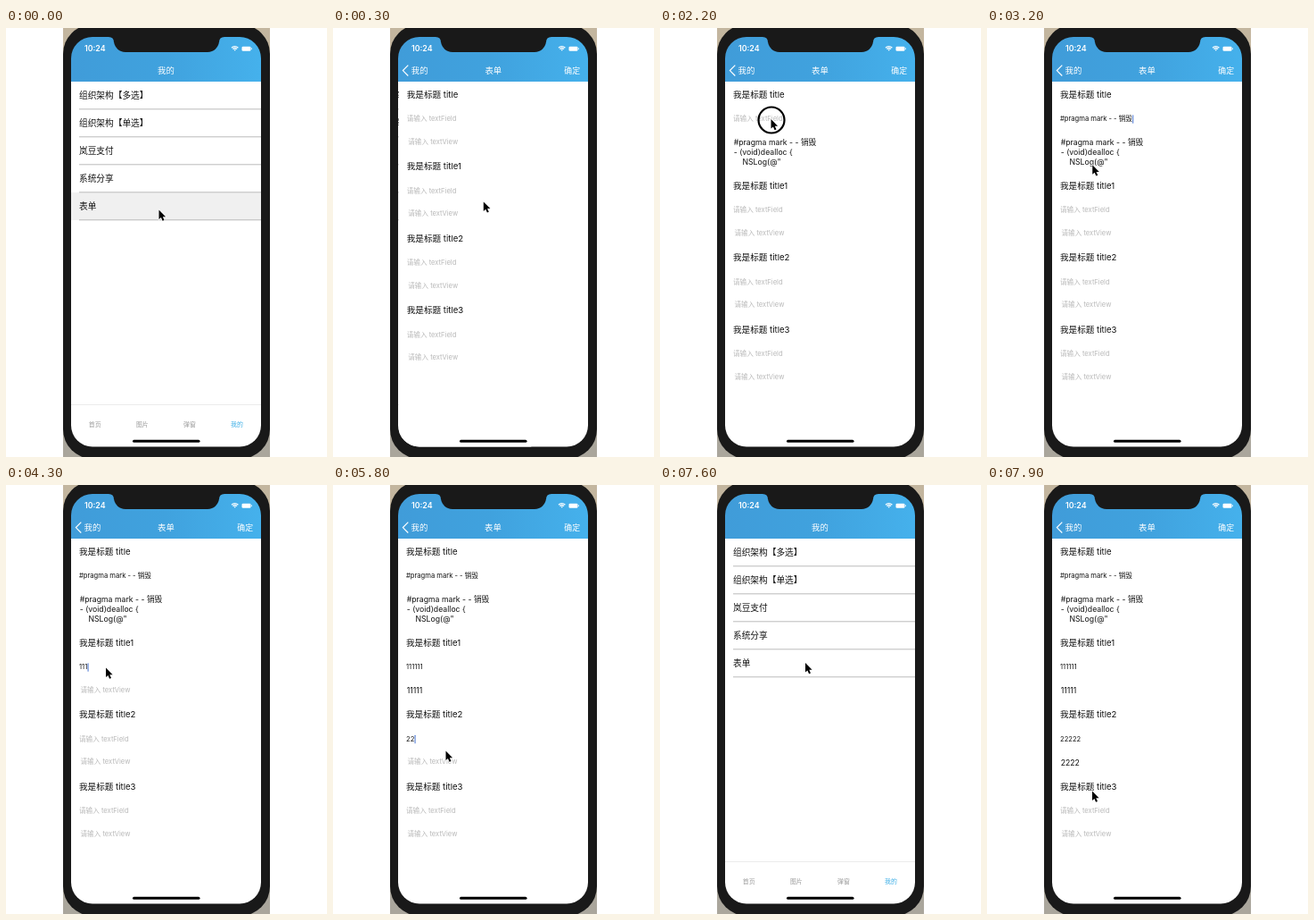
Recreate the animation shown at these times as an HTML page with a canvas. Size 360 by 480 pixels, loop 8000 ms.

```html
<!DOCTYPE html>
<html lang="zh">
<head>
<meta charset="utf-8">
<style>
html, body { margin: 0; height: 100%; overflow: hidden; background: #fff; }
canvas { display: block; width: 360px; height: 480px; }
</style>
</head>
<body>
<canvas></canvas>
<script>
const LOOP = 8000, STEP = 100;
const LEFT = 73, RIGHT = 286, WIDTH = RIGHT - LEFT;
const FONT = 'Inter, "Noto Sans CJK SC", "Noto Sans CJK", sans-serif';
const BLUE = '#3daee6';

const canvas = document.querySelector('canvas');
const c = canvas.getContext('2d');
const dpr = window.devicePixelRatio || 1;
canvas.width = 360 * dpr;
canvas.height = 480 * dpr;

const rows = ['组织架构【多选】', '组织架构【单选】', '岚豆支付', '系统分享', '表单'];
const tabs = ['首页', '图片', '弹窗', '我的'];
const snippet = '#pragma mark - - 销毁';

// Inputs in pairs (text field, text view): focus begins/ends, typing starts, ms per key
const inputs = [
  { text: snippet, focus: [2300, 3700], start: 2700, key: 0 },
  { text: snippet + '\n- (void)dealloc {\n    NSLog(@"', focus: [1400, 2100], start: 1800, key: 0 },
  { text: '111111', focus: [3800, 4750], start: 4100, key: 100 },
  { text: '11111', focus: [4800, 5450], start: 4900, key: 80 },
  { text: '22222', focus: [5500, 6250], start: 5700, key: 100 },
  { text: '2222', focus: [6300, 6900], start: 6400, key: 80 }
];

// Pointer stops: time, x, y
const stops = [
  [0, 171.5, 203.5], [200, 171.5, 203], [700, 158, 160], [800, 158, 160],
  [1200, 145.5, 122.5], [1900, 145.5, 122.5], [2100, 124.5, 102], [2800, 124.5, 102],
  [3600, 112, 204.5], [4400, 112, 204.5], [4700, 124, 229], [5000, 124, 229],
  [5400, 125, 284], [5600, 125, 284], [5800, 126.5, 297.5], [6200, 126.5, 308],
  [6500, 126.5, 308], [6900, 92, 48], [7000, 92, 48], [7400, 163, 199],
  [7700, 163, 199], [7900, 118, 342.5]
];
const clicks = [1200, 2100, 3700, 4700, 5400, 6200, 6900];

const clamp = v => Math.max(0, Math.min(1, v));
const easeOut = v => 1 - (1 - clamp(v)) ** 3;

function text(str, x, y, size, color = '#111', align = 'left', weight = 400) {
  c.font = `${weight} ${size}px ${FONT}`;
  c.fillStyle = color;
  c.textAlign = align;
  c.fillText(str, x, y);
}

function box(x, y, w, h, r, color) {
  c.fillStyle = color;
  c.beginPath();
  c.roundRect(x, y, w, h, r);
  c.fill();
}

function line(points, color, width) {
  c.strokeStyle = color;
  c.lineWidth = width;
  c.beginPath();
  points.forEach(([x, y]) => c.lineTo(x, y));
  c.stroke();
}

function typed(input, t) {
  if (t < input.start) return '';
  return input.key ? input.text.slice(0, Math.floor((t - input.start) / input.key) + 1) : input.text;
}

function pointerAt(t) {
  const i = stops.findIndex(s => s[0] > t);
  if (i < 0) return stops[stops.length - 1].slice(1);
  const [t0, x0, y0] = stops[i - 1], [t1, x1, y1] = stops[i];
  const k = (t - t0) / (t1 - t0);
  return [x0 + (x1 - x0) * k, y0 + (y1 - y0) * k];
}

// 0 shows the list, 1 shows the form
function formShown(t) {
  if (t < 7000) return easeOut((t - 20) / 330);
  if (t < 7600) return 1 - easeOut((t - 6960) / 330);
  return easeOut((t - 7610) / 190);
}

function drawList(selected) {
  box(LEFT, 60, WIDTH, 410, 0, '#fff');
  if (selected) box(LEFT, 184, WIDTH, 31, 0, '#f0f0f0');
  rows.forEach((label, i) => {
    const y = 60 + 31 * i;
    text(label, 82, y + 19.2, 9.7);
    line([[82, y + 30.8], [RIGHT, y + 30.8]], '#b4b4b4', 0.9);
  });
  line([[LEFT, 421.5], [RIGHT, 421.5]], '#e6e6e6', 0.8);
  tabs.forEach((label, i) =>
    text(label, 99.7 + 53.1 * i, 446, 6.9, i === 3 ? BLUE : '#999', 'center'));
}

function drawInput(input, isView, y, t) {
  const value = input ? typed(input, t) : '';
  const x = isView ? 82.7 : 82;
  const size = isView ? 8.7 : 7.6;
  const lines = value.split('\n');
  if (value) lines.forEach((s, i) => text(s, x, y + (isView ? 1.2 : 0) + 10.7 * i, size));
  else text('请输入 ' + (isView ? 'textView' : 'textField'), isView ? 83.5 : 82, y, 7.6, '#b9b9b9');

  if (input && t >= input.focus[0] && t < input.focus[1]) {
    const last = lines.length - 1;
    c.font = `400 ${size}px ${FONT}`;
    const end = x + c.measureText(lines[last]).width + 0.3;
    box(end, y - 7 + 10.7 * last, 1, 9.5, 0.5, '#4573d2');
  }
}

function drawForm(t) {
  box(LEFT, 60, WIDTH, 410, 0, '#fff');
  const grow = typed(inputs[1], t) ? 21.5 : 0;
  for (let i = 0; i < 4; i++) {
    const y = 80.5 * i + (i ? grow : 0);
    text('我是标题 title' + (i || ''), 82, y + 77.7, 9.6);
    drawInput(inputs[2 * i], false, y + 104.2, t);
    drawInput(inputs[2 * i + 1], true, y + 129.9, t);
  }
}

function drawHeader(p) {
  const g = c.createLinearGradient(LEFT, 0, RIGHT, 0);
  g.addColorStop(0, '#409cd9');
  g.addColorStop(0.5, '#40a2de');
  g.addColorStop(1, '#45b1ec');
  box(LEFT, 8, WIDTH, 52, 0, g);

  text('10:24', 88, 26.3, 8.8, '#fff', 'left', 600);
  c.strokeStyle = '#fff';
  c.lineWidth = 1.3;
  for (const r of [1, 3, 5]) {
    c.beginPath();
    c.arc(256.7, 25.7, r, -Math.PI * 0.76, -Math.PI * 0.24);
    c.stroke();
  }
  box(264.5, 20.7, 10, 5, 1.3, '#fff');
  box(275, 22.2, 0.8, 2, 0.4, '#fff');

  c.globalAlpha = 1 - p;
  text('我的', 179.5 - 82 * p, 51, 9.4, '#fff', 'center');
  c.globalAlpha = p;
  text('表单', 179.5 + 90 * (1 - p), 51, 9.4, '#fff', 'center');
  line([[84.3, 41.7], [78.4, 47.6], [84.3, 53.5]], '#fff', 1.2);
  text('我的', 87.5 + 82 * (1 - p), 51, 9.4, '#fff');
  text('确定', 277, 50.7, 8.9, '#fff', 'right');
  c.globalAlpha = 1;
}

function drawNotch() {
  const color = '#191919';
  box(121, 0, 118, 27, [0, 0, 13, 13], color);
  c.beginPath();
  c.moveTo(115, 9);
  c.lineTo(115, 10);
  c.quadraticCurveTo(121, 10, 121, 16);
  c.lineTo(239, 16);
  c.quadraticCurveTo(239, 10, 245, 10);
  c.lineTo(245, 9);
  c.fill();
}

function shifted(dx, draw) {
  c.save();
  c.translate(dx, 0);
  draw();
  c.restore();
}

function drawPointer(t) {
  const [x, y] = pointerAt(t);
  if (clicks.some(start => t >= start && t < start + 200)) {
    c.strokeStyle = '#000';
    c.lineWidth = 2.2;
    c.beginPath();
    c.arc(x + 0.5, y + 1, 14.5, 0, 7);
    c.stroke();
  }
  shifted(0, () => {
    c.translate(x, y);
    const arrow = new Path2D('M0 0V10.6L2.4 8.4L4.1 12.2L6 11.4L4.3 7.7H7.6Z');
    c.strokeStyle = '#fff';
    c.lineWidth = 1.2;
    c.stroke(arrow);
    c.fillStyle = '#000';
    c.fill(arrow);
  });
}

function draw(t) {
  const p = formShown(t);
  c.setTransform(dpr, 0, 0, dpr, 0, 0);
  box(0, 0, 360, 480, 0, '#fff');
  box(64, 0, 232, 240, 0, '#c3b69f');
  box(64, 240, 232, 240, 0, '#aaa69c');
  box(64, -4, 232, 486, 33, '#191919');

  c.save();
  c.beginPath();
  c.roundRect(LEFT, 10, WIDTH, 458.5, 24);
  c.clip();
  if (p < 1) shifted(-0.3 * WIDTH * p, () => drawList(t < 1000 || t >= 7650));
  if (p > 0) shifted(WIDTH * (1 - p), () => drawForm(t));
  drawHeader(p);
  box(142, 460.8, 75.5, 3, 1.5, '#000');
  c.restore();

  drawNotch();
  drawPointer(t);
}

function tick(now) {
  draw(Math.floor(now % LOOP / STEP) * STEP);
  requestAnimationFrame(tick);
}
requestAnimationFrame(tick);
</script>
</body>
</html>
```
